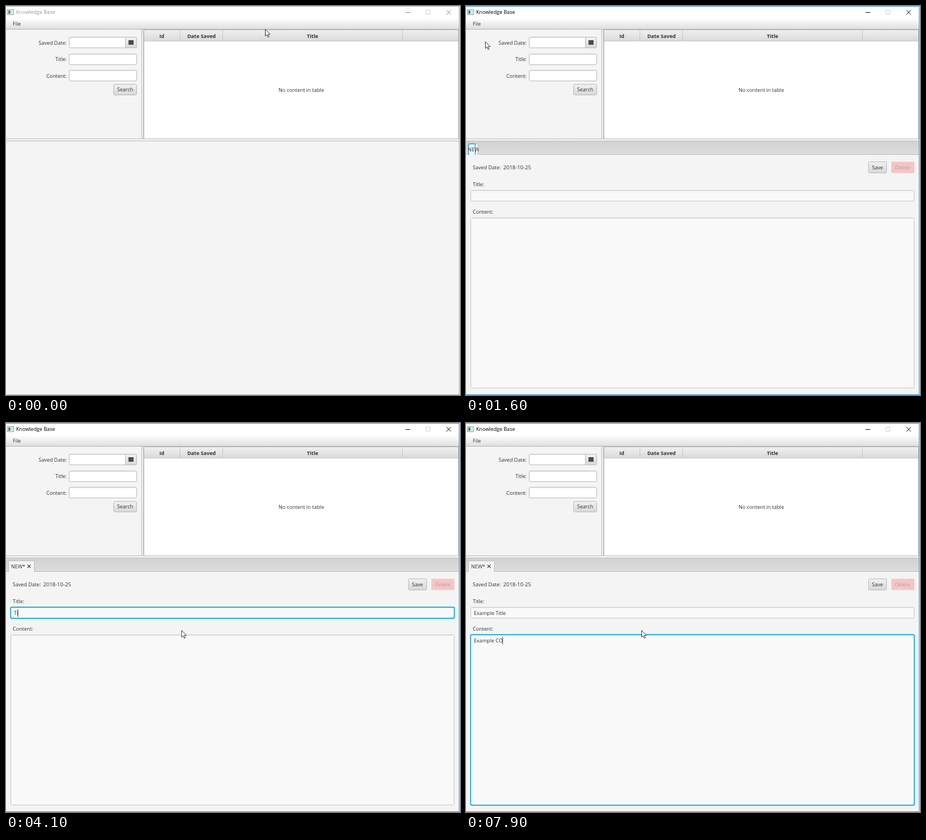
These frames come from a looping animation (808x693 px, 8 s). An HTML page:

```html
<!DOCTYPE html>
<html lang="en">
<head>
<meta charset="utf-8">
<title>Knowledge Base</title>
<style>
  html, body { margin: 0; width: 100%; height: 100%; overflow: hidden; background: #f4f4f4; }
  svg { display: block; }
  text { font: 9.1px "Open Sans", "Noto Sans", sans-serif; fill: #333; white-space: pre; }
  .bold { font-weight: 700; }
  .mid { text-anchor: middle; }
  .end { text-anchor: end; }
  .date { font-size: 9.5px; }
</style>
</head>
<body>
<svg id="stage" width="808" height="693" viewBox="0 0 808 693">
  <defs>
    <linearGradient id="bar" x2="0" y2="1"><stop stop-color="#fefefe"/><stop offset="1" stop-color="#dfdfdf"/></linearGradient>
    <linearGradient id="head" x2="0" y2="1"><stop stop-color="#f0f0f0"/><stop offset="1" stop-color="#dadada"/></linearGradient>
    <linearGradient id="btn" x2="0" y2="1"><stop stop-color="#f1f1f1"/><stop offset="1" stop-color="#d8d8d8"/></linearGradient>
    <linearGradient id="field" x2="0" y2="1"><stop stop-color="#efefef"/><stop offset=".2" stop-color="#fff"/></linearGradient>
    <linearGradient id="tabs" x2="0" y2="1"><stop stop-color="#d2d2d2"/><stop offset="1" stop-color="#dedede"/></linearGradient>
    <clipPath id="tabClip"><rect id="tabClipBox" x="3" y="244" width="48" height="22"/></clipPath>
  </defs>
</svg>
<script>
const NS = 'http://www.w3.org/2000/svg';
const stage = document.getElementById('stage');
const BLUE = '#0fa5d6', EDGE = '#b9b9b9', LOOP = 8000;

function set(el, attrs) {
  for (const k in attrs) el.setAttribute(k, attrs[k]);
  return el;
}
function add(tag, attrs, parent = stage) {
  return parent.appendChild(set(document.createElementNS(NS, tag), attrs));
}
const group = (parent, attrs = {}) => add('g', attrs, parent);
const show = (el, on) => set(el, { visibility: on ? 'visible' : 'hidden' });

function rect(x, y, width, height, fill, parent, more) {
  return add('rect', { x, y, width, height, fill, ...more }, parent);
}
function box(x, y, w, h, fill, parent, stroke = EDGE, r = 2) {
  return rect(x + .5, y + .5, w - 1, h - 1, fill, parent, { stroke, rx: r });
}
function path(d, stroke, parent, more) {
  return add('path', { d, stroke, fill: 'none', ...more }, parent);
}
// y is the visual middle of the line
function label(str, x, y, cls = '', parent = stage) {
  const el = add('text', { x, y: y + 3.3, class: cls }, parent);
  el.textContent = str;
  return el;
}
function button(str, x, y, w, h) {
  box(x, y, w, h, 'url(#btn)');
  label(str, x + w / 2, y + h / 2, 'mid');
}

// Title bar
rect(0, 0, 808, 693, '#f4f4f4');
rect(0, 0, 807, 22, '#fff');
rect(2.5, 6.5, 11, 9, '#fff', stage, { stroke: '#8a9298' });
rect(4, 8, 4, 6, '#3f8f86');
rect(9, 8, 3, 6, '#d5dadd');
const caption = label('Knowledge Base', 18, 11);
const winIcons = path('M711 11.5H719.5M783.8 7.3L791.8 15.3M791.8 7.3L783.8 15.3', '#000');
rect(747.5, 7.5, 7, 7, 'none', stage, { stroke: '#d0d0d0' });

// Menu bar
rect(0, 22, 806, 19, 'url(#bar)');
rect(0, 41, 806, 1, '#b4b4b4');
const fileHot = rect(5, 22, 28, 19, '#0096c9');
const fileText = label('File', 12, 31.7);

// Search form
label('Saved Date:', 108, 65.3, 'end');
label('Title:', 108, 95, 'end');
label('Content:', 108, 124.5, 'end');
for (const y of [55, 84.5, 114]) box(112, Math.round(y), 121, 20, 'url(#field)');
box(212, 55, 21, 20, 'url(#btn)');
rect(218, 61, 9, 8, '#444');
path('M219 63.5H226M219 65.5H226M219 67.5H226', '#777', stage, { 'stroke-dasharray': '1 1', 'stroke-width': .7 });
button('Search', 191, 139, 42, 20);

// Split dividers and table
rect(240, 42, 6, 195, '#ededed');
path('M241.5 42V237M244.5 42V237', '#c6c6c6');
rect(245.5, 42.5, 560, 194, '#fff', stage, { stroke: '#b4b4b4' });
rect(246, 43, 559, 19, 'url(#head)');
path('M246 62.5H805M309.5 43V62M385.5 43V62M705.5 43V62', '#c6c6c6');
label('Id', 277.5, 53.2, 'bold mid');
label('Date Saved', 348, 53.2, 'bold mid');
label('Title', 545.5, 53.2, 'bold mid');
label('No content in table', 525.5, 149.3, 'mid');
rect(0, 237, 806, 4, '#f2f2f2');
path('M0 236.5H806M0 240.5H806', '#bdbdbd');

// Editor
const editor = group(stage);
rect(0, 241, 806, 24, 'url(#tabs)', editor);
rect(0, 264, 806, 1, '#b9b9b9', editor);
const tab = group(editor);
const tabBox = path('', EDGE, tab, { fill: '#f4f4f4' });
const tabRing = path('', BLUE, tab, { 'stroke-width': 1.3 });
const tabText = label('NEW', 9, 255.4, '', group(tab, { 'clip-path': 'url(#tabClip)' }));
const tabClose = path('M-2.8 -2.8L2.8 2.8M2.8 -2.8L-2.8 2.8', '#444', tab, { 'stroke-width': 1.3 });
label('Saved Date:', 12, 287.5, '', editor);
label('2018-10-25', 66.3, 287.5, 'date', editor);
const save = group(editor);
box(716, 277, 33, 21, 'url(#btn)', save);
label('Save', 732.3, 287.5, 'mid', save);
rect(757, 277.5, 41, 20, '#f5c5c5', editor, { rx: 2 });
set(label('Delete', 777.2, 287.5, 'mid', editor), { style: 'fill:#b5a3a3' });
label('Title:', 12, 317.3, '', editor);
label('Content:', 12, 366.8, '', editor);

function input(y, h) {
  box(8, y, 790, h, '#f9f9f9', editor, '#c4c4c4');
  rect(9, y + 1, 788, 1, '#efefef', editor);
  const ring = rect(8.2, y + .2, 789.6, h - .4, 'none', editor, { stroke: BLUE, 'stroke-width': 1.7, rx: 2 });
  const text = label('', 14, y + 10.4, '', editor);
  const caret = rect(14, y + 4, 1, 13, '#222', editor);
  return (str, focus) => {
    text.textContent = str;
    show(ring, focus);
    show(caret, focus);
    set(caret, { x: 14 + (str ? Math.round(text.getComputedTextLength()) - .4 : 0) });
  };
}
const titleInput = input(328, 20);
const bodyInput = input(377, 304);

// Popup menu
const menu = group(stage);
rect(7, 43, 84, 29, '#000', menu, { opacity: .12, rx: 2 });
rect(5.5, 41.5, 84, 28, '#f6f6f6', menu, { stroke: '#c0c0c0' });
const itemHot = rect(6, 45, 83, 21, '#0096c9', menu);
const itemText = label('New', 15, 55.5, '', menu);

// Window border
const border = path('M0 .5H806.5V692.5H0', '#aaa');

// Pointers
const arrow = path('M.5 .5V12.6L3.3 10L5.3 14.6L7.2 13.8L5.2 9.3H9Z', '#222', stage, { fill: '#fff', 'stroke-width': .9 });
const beam = path('M-2.5 -5.5H-.5L0 -5L.5 -5.5H2.5M0 -5V5M-2.5 5.5H-.5L0 5L.5 5.5H2.5', '#222');

// [time, x, y]
const route = [
  [0, 461, 41], [100, 461, 41], [300, 300, 8], [600, 110, 20], [900, 26, 33], [1100, 27, 34],
  [1200, 30, 46], [1300, 33, 57], [1400, 34, 63], [1600, 34, 63], [1900, 52, 150],
  [2200, 80, 290], [2500, 91, 341], [2700, 92, 341], [2900, 190, 384], [3000, 246, 391],
  [3200, 312, 369], [LOOP, 312, 369]
];
function pointerAt(t) {
  const i = Math.max(1, route.findIndex(p => p[0] >= t));
  const [a, b] = [route[i - 1], route[i]];
  const k = (t - a[0]) / (b[0] - a[0]);
  return [1, 2].map(n => Math.round(a[n] + (b[n] - a[n]) * k));
}

// [time, text]
const typedTitle = [
  [0, ''], [3600, 'T'], [3700, 'Tit'], [4100, 'Ti'], [4300, 'T'], [4400, ''], [4500, 'E'],
  [4700, 'Exa'], [4800, 'Examp'], [5000, 'Example'], [5100, 'Example '], [5200, 'Example T'],
  [5300, 'Example Tit'], [5500, 'Example Title']
];
const typedBody = [
  [0, ''], [6000, 'E'], [6200, 'Ex'], [6300, 'Exa'], [6400, 'Exam'], [6500, 'Examp'],
  [6600, 'Example'], [6700, 'Example '], [6800, 'Example C'], [6900, 'Example CO'],
  [7000, 'Example COnt'], [7100, 'Example COnte'], [7200, 'Example COntent'],
  [7500, 'Example COnte'], [7700, 'Example COnt'], [7800, 'Example COn'], [7900, 'Example CO']
];
const latest = (list, t) => list.filter(e => e[0] <= t).pop()[1];

function drawTab(t, focus) {
  const opening = t < 1700, dirty = t >= 3600;
  const right = opening ? 21.5 : t < 1800 ? 38.5 : dirty ? 50.5 : 46.5;
  const outline = r => `M4.5 265V247.5Q4.5 245.5 6.5 245.5H${r - 2}Q${r} 245.5 ${r} 247.5V265`;
  set(tabBox, { d: outline(right) });
  set(tabRing, { d: outline(opening ? 16.5 : right) });
  show(tabRing, focus);
  set(document.getElementById('tabClipBox'), { width: right - 2 });
  tabText.textContent = dirty ? 'NEW*' : 'NEW';
  set(tabText, { x: opening ? 3.3 : 9 });
  set(tabClose, { transform: `translate(${dirty ? 41 : 37} 255.2)`, display: t < 1800 ? 'none' : 'inline' });
}

function draw(ms) {
  const t = Math.floor((ms % LOOP) / 100 + .001) * 100;
  const active = t >= 300;
  set(border, { stroke: active ? '#2d86c9' : '#a6a6a6' });
  caption.style.fill = active ? '#000' : '#999';
  set(winIcons, { stroke: active ? '#000' : '#888' });

  const hot = t >= 800 && t < 1600;
  show(fileHot, hot);
  fileText.style.fill = hot ? '#fff' : '#333';

  const picked = t >= 1200;
  set(menu, { display: t >= 1000 && t < 1600 ? 'inline' : 'none' });
  set(itemHot, { opacity: picked ? 1 : 0 });
  itemText.style.fill = picked ? '#fff' : '#333';

  set(editor, { display: t >= 1600 ? 'inline' : 'none' });
  if (t >= 1600) {
    drawTab(t, t < 2700);
    titleInput(latest(typedTitle, t), t >= 2700 && t < 5700);
    bodyInput(latest(typedBody, t), t >= 5700);
  } else {
    titleInput('', false);
    bodyInput('', false);
    show(tabRing, false);
  }

  const [x, y] = pointerAt(t);
  const overText = t >= 1600 && (y > 328 && y < 348 || y > 377);
  const seen = t < 100 || t >= 300;
  show(arrow, seen && !overText);
  show(beam, seen && overText);
  set(arrow, { transform: `translate(${x} ${y})` });
  set(beam, { transform: `translate(${x + .5} ${y + .5})` });
}

const start = performance.now();
function tick() {
  draw(performance.now() - start);
  requestAnimationFrame(tick);
}
draw(0);
requestAnimationFrame(tick);
</script>
</body>
</html>
```
